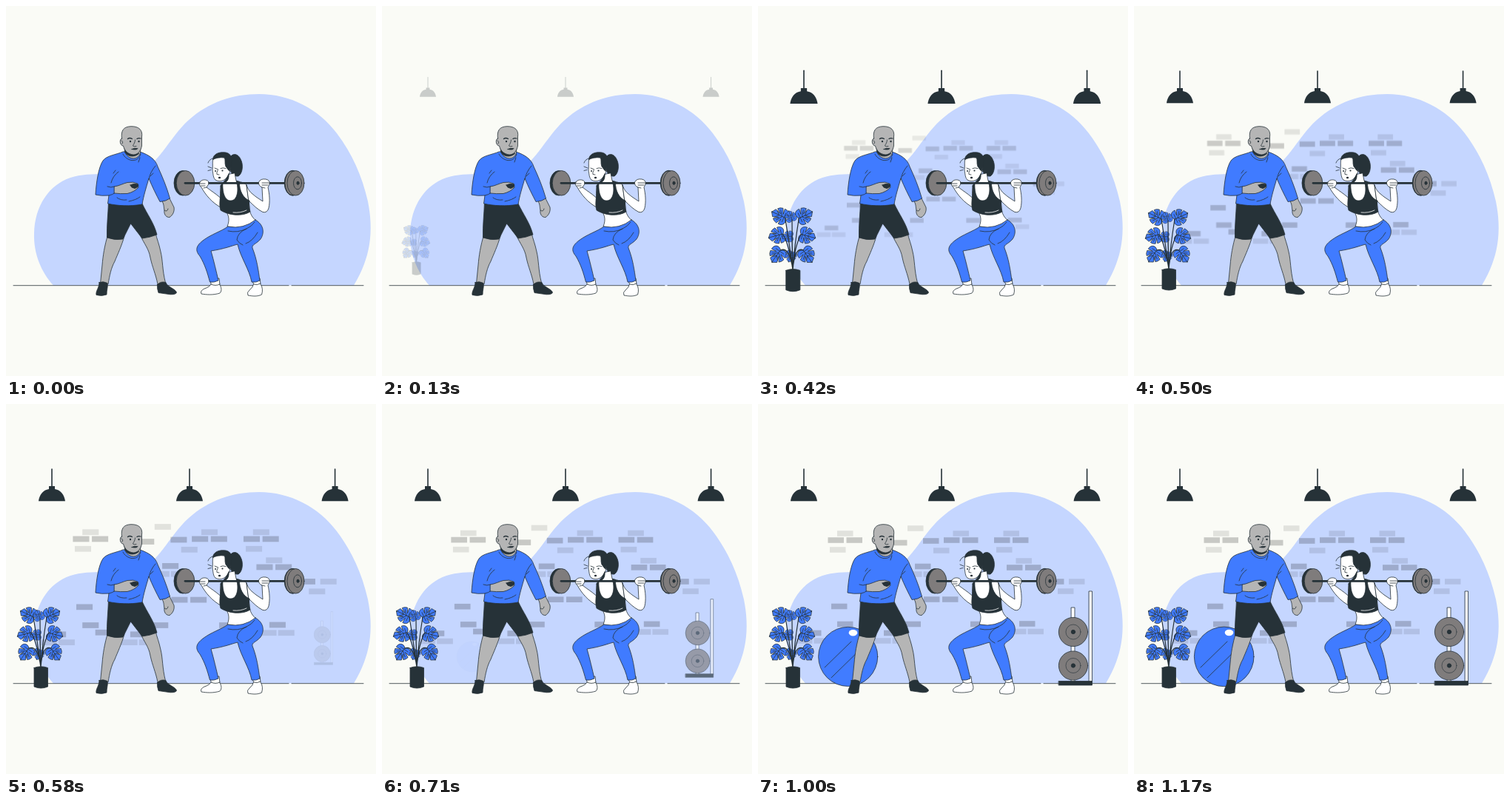
Write an HTML page that moves like this. It is 500 px wide and 500 px high and loops after 1.21 s.

```html
<!DOCTYPE html>
<html lang="en">
<head>
<meta charset="utf-8">
<title>Squat training</title>
<style>
html, body { margin: 0; width: 100%; height: 100%; overflow: hidden; background: #fafbf6; }
svg { display: block; width: 100%; height: 100%; }
.art { stroke: #263238; stroke-width: .8; stroke-linejoin: round; stroke-linecap: round; }
.blue { fill: #407bff; }
.dark { fill: #263238; }
.skin { fill: #b5b5b5; }
.iron { fill: #7f7c7c; }
.white { fill: #fff; }
.line { fill: none; }
</style>
</head>
<body>
<svg viewBox="0 0 500 500">
  <defs>
    <g id="lamp">
      <path class="line" stroke-width="1.6" d="M0 88V112"/>
      <path class="dark" stroke="none" d="M-4 111H4V115C12 116 17 123 18 131.300H-18C-17 123-12 116-4 115Z"/>
    </g>
    <g id="half">
      <path d="M0 0C-6-6-13-1-12 6L-4 5L-12 9Q-11 14-8 16L-3 9L-6 18Q-3 20 0 22Z"/>
      <path class="line" d="M0 2L-7 2M0 5L-8 11M0 10L-5 15"/>
    </g>
    <g id="leaf"><use href="#half"/><use href="#half" transform="scale(-1 1)"/></g>
    <g id="disc">
      <circle class="iron" r="19.600"/><circle class="line" r="10" stroke-width=".6"/>
      <circle class="dark" r="2.700"/>
    </g>
  </defs>

  <path fill="#c5d6ff" d="M64 377.500C48 360 37 335 38 307C39 270 58 242 87 232C115 223 150 230 175 225C206 218 219 179 247 154C274 130 306 119 342 119C384 119 422 139 447 172C468 200 481 229 489 264C497 304 493 340 470 377.500Z"/>

  <g id="bricks"></g>

  <g class="art">
    <use class="lamp" href="#lamp" x="62"/>
    <use class="lamp" href="#lamp" x="248"/>
    <use class="lamp" href="#lamp" x="444.600"/>
  </g>

  <path class="art" d="M10 377.700H382M386 377.700H483"/>

  <g id="plant" class="art">
    <g id="leaves" class="blue"></g>
    <path class="dark" d="M38 356.500V382Q47 386 56.500 382V356.500Q47 353 38 356.500Z"/>
  </g>

  <g id="ball" class="art">
    <circle class="blue" cx="121.700" cy="341.400" r="40.300"/>
    <ellipse class="white" stroke="none" cx="128.500" cy="309" rx="5.800" ry="4.200"/>
    <path class="line" d="M90 356L126 321M99 370L139 331"/>
  </g>

  <g id="rack" class="art">
    <path class="white" d="M423.500 275H428V376H423.500ZM447.500 253H451.500V376H447.500Z"/>
    <use href="#disc" x="426" y="308"/><use href="#disc" x="426" y="353.500"/>
    <path class="dark" d="M406.500 374.500H451.500V380H406.500Z"/>
  </g>

  <g id="trainer" class="art">
    <path class="skin" d="M138 308C133 324 131 338 130 350L127.500 375L138 376C140 364 142 354 147 345C151 335 156 325 160 311Z"/>
    <path class="skin" d="M181 309C187 322 193 328 195 340C198 354 202 361 205 376L215.500 374C211 356 212 344 209 332C207 322 204 315 202 307Z"/>
    <path class="dark" d="M126 373.500Q132 371.500 137 374.500C138 380 136 383 136 390Q130 392.500 122 390.500C121 385 126 381 126 373.500Z"/>
    <path class="dark" d="M204.500 376.500Q209 371.500 216 373.500C218 380 229 382 230.500 387Q230 390 222 389.800L206 387.500Q204 382 204.500 376.500Z"/>
    <path class="dark" d="M138.500 265C138 282 136 296 136.500 313Q147 317 158 315L168.500 294L184 314Q194 313 204 309C200 293 191 282 184 267Z"/>
    <path class="skin" d="M210 262C214 268 213 272 214 276C213 282 217 286 221 285.500C225 283 228 278 227 272L220 258Z"/>
    <path class="line" d="M214 276Q218 279 219 274"/>
    <path class="blue" d="M158 197C149 201 136 202 131 209C125 218 122 238 121 255Q129 257 139 256L137.500 267C150 270 168 271 184 268C186 256 189 247 193 233C198 245 203 255 208 264.500Q216 264 221.500 260C217 244 211 230 205 217C202 207 193 201 181 197Z"/>
    <path class="skin" d="M160 190L161 198C165 207 177 210 181.500 199L182 187Z"/>
    <path class="dark" d="M160 192L161 198C166 205 175 204 180 199C170 203 164 198 160 192Z"/>
    <path class="skin" d="M156.500 179C155 168 159 163 169 162.700C180 162.500 185 168 183.500 177V189C182 197 177 201 172 201C164 200 160 195 158.500 189C154 189 152.500 180 156.500 179Z"/>
    <path class="line" stroke-width="1.300" d="M164.500 179.500Q167 177.500 170.500 179.500M177 179.500Q179 178 182 179"/>
    <path class="line" d="M174.500 181C174 186 172 187 171.500 189Q173 190.500 176 189.500M156 182Q159 183 157 186"/>
    <path class="dark" d="M170 193.500Q174 191.500 178 192.500Q177 195 170 193.500Z"/>
    <g class="dark" stroke="none"><circle cx="168" cy="183" r="1.200"/><circle cx="179.500" cy="183" r="1.200"/></g>
    <path class="line" d="M158 200C162 209 178 214 182 200M152 224Q144 230 142 239M148 222L145 226M202 216Q195 224 193 234M199 226L195 230M150 259Q155 263 163 262M166 264Q176 262 181 258M181 205L179 211"/>
    <path class="skin" d="M146.500 244C153 243 158 240 164 238.500Q172 237 178 240L179 245Q174 251 164 253.500Q154 254 146.500 253Z"/>
    <path class="dark" d="M168 242Q173 239 178.500 241Q180 245 174 246.500Q169 246 168 242Z"/>
    <path class="line" d="M139 256Q144 255 146.500 253M137 244Q142 246 146.500 244"/>
  </g>

  <g id="lifter" class="art">
    <path class="dark" d="M303 204C307 198 314 200 317 207C321 214 320 226 314 230C307 231 303 225 302 217Z"/>
    <path class="white" d="M276 370L288 368L289 377C292 382 291 386 289 388C280 391 270 390 264 389Q262 385 268 382Q275 380 277 376Z"/>
    <path class="white" d="M333 370L343 368L344 376Q348 382 345.500 390C339 393 333 392 327 391Q325 387 329 384Q334 380 334.500 376Z"/>
    <path class="line" d="M277 376Q283 379 289 376M334.500 376Q339 378 344 375"/>
    <path class="white" d="M300 228C301 235 297 238 291 241C288 252 290 263 294 274C301 281 303 288 299 298Q322 304 339 291C333 286 329 281 329 271L325 242C322 238 316 238 311 236L309 226Z"/>
    <path class="blue" d="M337 289C348 295 350 306 344 315C338 322 332 322 333 327C339 342 341 357 343 371Q338 374 332 373C329 356 317 340 313 322C305 324 296 328 277 331C281 345 284 358 287 371Q281 374 275.500 373C272 360 269 350 262 338C255 330 257 324 266 317C278 308 290 305 300 298Q321 302 337 289Z"/>
    <path class="line" d="M300 304Q313 307 325 301Q332 298 336 292M325 301Q313 306 312 316Q315 321 320 323M340 306Q333 318 324 321"/>
    <ellipse class="dark" cx="239" cy="239.300" rx="12" ry="16.800"/>
    <ellipse class="iron" cx="242.500" cy="239.300" rx="12.300" ry="16.800"/>
    <path class="line" stroke-width="2.700" d="M242 239.300H383"/>
    <ellipse class="dark" cx="387.500" cy="239.300" rx="11.300" ry="17"/>
    <ellipse class="iron" cx="386.700" cy="239.300" rx="9.700" ry="16.300"/>
    <ellipse class="iron" cx="391.500" cy="239.300" rx="11.500" ry="16.800"/>
    <ellipse class="line" cx="394" cy="239.300" rx="5.500" ry="8.500"/>
    <ellipse class="dark" cx="394.500" cy="239.300" rx="1.600" ry="2.200"/>
    <path class="white" d="M262 238C264 234 271 234 273.500 237Q275 241 271 245C276 249 284 254 289.500 259L290 272C279 266 270 256 264 245Q260 242 262 238Z"/>
    <path class="line" d="M262 240L269 240M263 243L269 243M271 245L267 246"/>
    <path class="white" d="M325 242C328 251 332 253 338 258L347 264L346 245Q341 243 341.500 238Q344 233 351 234Q357 235 356 241L354 245C356 254 357 264 355 273Q353 280 347 278.500C340 275 334 269 328 263Z"/>
    <path class="line" d="M346 239L355 239M346 242L354 242M346 245L350 246"/>
    <path class="dark" d="M290 243L293 239C292 254 297 264 304 263C313 263 315 247 311 236.500L315.500 237.500C315 250 321 260 329 263C328 270 329 274 330 278C319 285 301 283 290 276C287 266 291 256 290 243Z"/>
    <path class="line" stroke="#fff" d="M307 279Q317 280 325 276"/>
    <path class="white" d="M281 204C278 210 280 216 279 221C280 228 280 232 283 235C288 238 294 237 298 232C303 228 304 220 303 206L296 199Z"/>
    <path class="dark" d="M279.500 207.500C280 199 289 197 297 198C304 199 306 206 305 213L302 223C300 222 299 219 297 217C295 212 297 208 295 205Q286 204 279.500 207.500Z"/>
    <path class="dark" d="M301 227C302 234 298 240 293 239Q298 234 301 227Z"/>
    <path class="line" d="M282 219L286 220.500M290 219.500Q293 218 297 219.500M286.500 221Q284 226 285 227.500L288 228M279 206Q274 208 273 212M273 217L278 219M273 222.500L277 221.500"/>
    <g class="dark" stroke="none"><circle cx="283" cy="223" r="1"/><circle cx="292.500" cy="222.500" r="1.100"/><ellipse cx="288.500" cy="232" rx="1.700" ry="1.300"/></g>
  </g>
</svg>
<script>
const $ = id => document.getElementById(id);

// Wall: repeated groups of dark and pale bricks.
const brick = (x, y, a = .2) =>
  `<rect x="${x}" y="${y - 3.8}" width="21.5" height="7.6" opacity="${a}"/>`;
const pale = (x, y) => brick(x, y, .1);
const pair = (x, y) => brick(x, y) + brick(x + 25, y);
const peak = (x, y) => pair(x, y) + pale(x + 12.5, y - 9);
const base = (x, y) => brick(x, y) + pale(x - 12, y + 10.5) + pale(x + 11.5, y + 10.5);

let wall = peak(336, 221) + pair(224, 264) + brick(223, 185) + brick(180, 187.5)
  + pale(237, 198) + pale(202, 168) + brick(99, 273.5) + brick(392, 240)
  + pale(420, 240) + pale(405, 253) + brick(124, 307);
for (const x of [94.5, 251, 319]) wall += peak(x, 184);
for (const x of [97, 322]) wall += pale(x, 197);
for (const x of [107, 198.5, 287]) wall += brick(x, 297.5);
wall += base(353, 297) + base(170, 309.5) + base(64, 309.5) + base(212, 219.5);
$('bricks').innerHTML = wall;

// Plant: three tiers of leaves on bent stems, spreading wider and drooping lower down.
let stems = '', leaves = '';
for (let i = 0; i < 9; i++) {
  const tier = i % 3, side = Math.floor(i / 3) - 1;
  const x = 46 + side * (9 + 3 * tier), y = 291 + 21 * tier - Math.abs(side) * 3;
  const turn = side ? -side * (115 - 40 * tier) : 160 - 70 * tier;
  stems += `M47 356Q${46 + side * 3} 325 ${x} ${y}`;
  leaves += `<use href="#leaf" transform="translate(${x} ${y}) rotate(${turn}) scale(${side ? .88 : .6})"/>`;
}
$('leaves').innerHTML = leaves + `<path class="line" stroke-width="1.2" d="${stems}"/>`;

// cubic-bezier(.36, -.01, .5, 1.38)
const bez = (u, a, b) => 3 * u * (1 - u) * ((1 - u) * a + u * b) + u ** 3;
function ease(p) {
  if (p <= 0) return 0;
  if (p >= 1) return 1;
  let lo = 0, hi = 1;
  for (let i = 0; i < 24; i++) {
    const mid = (lo + hi) / 2;
    if (bez(mid, .36, .5) < p) lo = mid; else hi = mid;
  }
  return bez(lo, -.01, 1.38);
}

// Element, centre, start and length in steps.
const pops = [
  ...[...document.querySelectorAll('.lamp')].map(el => [el, +el.getAttribute('x'), 109.5, 0, 12]),
  [$('plant'), 45.5, 331, 0, 12],
  [$('bricks'), 247, 242, 3.1, 14.2],
  [$('rack'), 429, 316.5, 11.9, 11.1],
  [$('ball'), 121.7, 341.4, 16, 12]
];

const LOOP = 1210, STEP = 1000 / 24;
function draw() {
  const t = performance.now() % LOOP;
  const step = Math.min(28, Math.floor((t + 5) / STEP));
  for (const [el, x, y, start, len] of pops) {
    const e = step < 2 ? 0 : ease((step - start) / len);
    const s = .5 + e / 2;
    el.setAttribute('opacity', Math.max(0, Math.min(1, e)));
    el.setAttribute('transform', `translate(${x} ${y}) scale(${s}) translate(${-x} ${-y})`);
  }
  requestAnimationFrame(draw);
}
draw();
</script>
</body>
</html>
```
